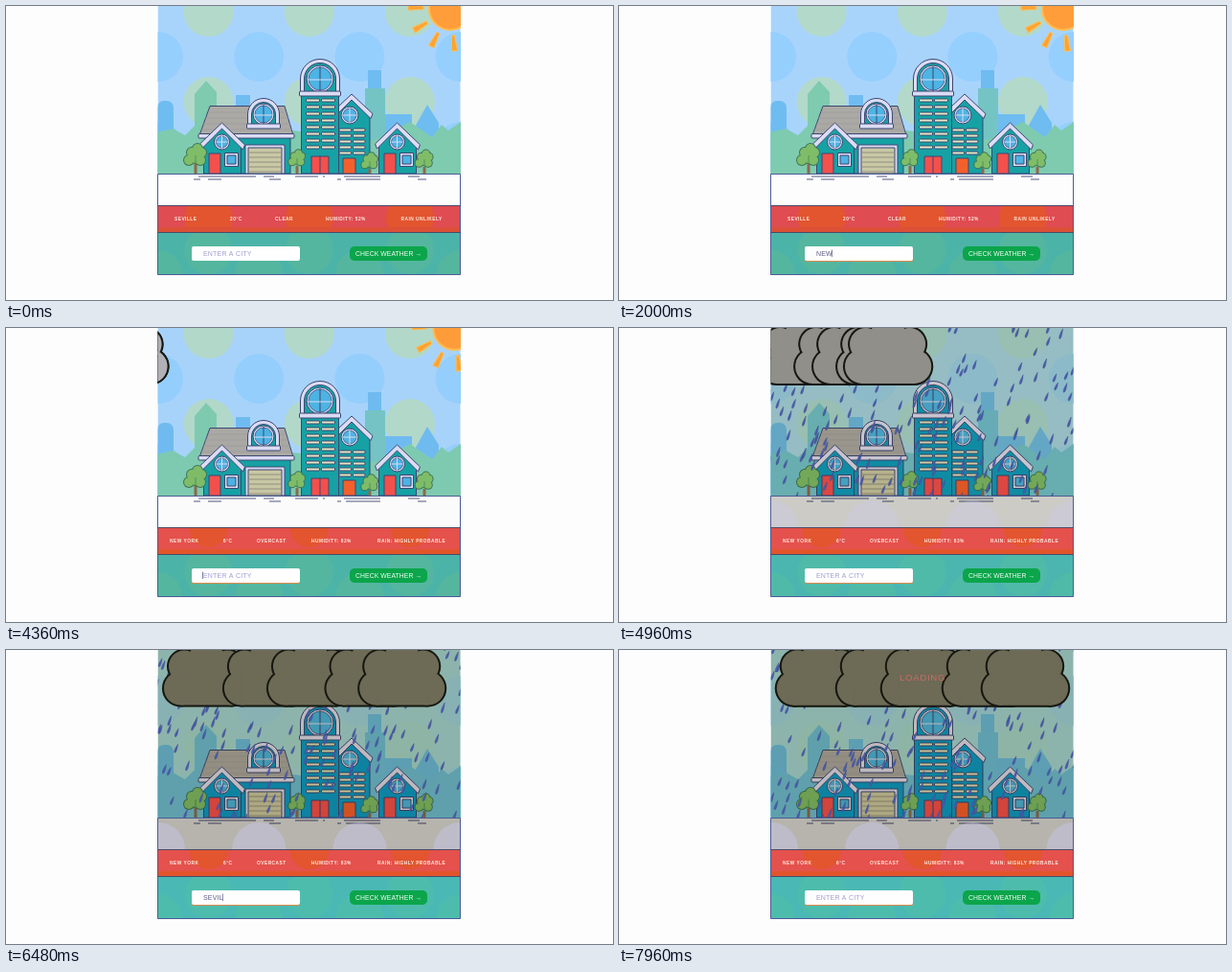
Recreate the animation shown at these times as an HTML page with a canvas. Size 634x307 px, loop 8000 ms.

```html
<!DOCTYPE html>
<html lang="en">
<head>
<meta charset="utf-8">
<title>City weather</title>
<style>
  html, body { margin: 0; width: 100%; height: 100%; overflow: hidden; background: #fdfdfe; }
  canvas { display: block; }
</style>
</head>
<body>
<canvas id="stage" width="634" height="307"></canvas>
<script>
const ctx = document.getElementById('stage').getContext('2d');
const LOOP = 8000, LEFT = 158.5, WIDTH = 316, GROUND = 176;
const INK = '#3d4773', TRIM = '#dcdcf4', GLASS = '#4db4e4', PANE = '#e4e8c4';
const STORM_START = 4325, DATA_CHANGE = 4240;

const reports = {
  sunny: [['SEVILLE', 176], ['20°C', 234], ['CLEAR', 281], ['HUMIDITY: 52%', 334], ['RAIN UNLIKELY', 412.5]],
  rainy: [['NEW YORK', 171], ['6°C', 227], ['OVERCAST', 262], ['HUMIDITY: 83%', 319], ['RAIN: HIGHLY PROBABLE', 388]]
};
const searches = [
  { word: 'NEW YORK', start: 1580, step: 180, submit: 3020, done: DATA_CHANGE },
  { word: 'SEVILLE', start: 5640, step: 170, submit: 6980, done: LOOP }
];

let dark = 0;  // 0 in sunshine, 1 in the full storm

const clamp = v => Math.max(0, Math.min(1, v));
const mix = (a, b, p) => `rgb(${a.map((v, i) => Math.round(v + (b[i] - v) * p))})`;
const weather = (sunny, stormy) => mix(sunny, stormy, dark);
const wall = () => weather([22, 162, 164], [14, 155, 206]);

function paint(fill, stroke, width = 1) {
  if (fill) { ctx.fillStyle = fill; ctx.fill(); }
  if (stroke) { ctx.strokeStyle = stroke; ctx.lineWidth = width; ctx.stroke(); }
}
function box(x, y, w, h, fill, stroke, radius = 0) {
  ctx.beginPath();
  ctx.roundRect(x, y, w, h, radius);
  paint(fill, stroke);
}
function circle(x, y, r, fill, stroke, width) {
  ctx.beginPath();
  ctx.arc(x, y, r, 0, Math.PI * 2);
  paint(fill, stroke, width);
}
function poly(points, fill, stroke) {
  ctx.beginPath();
  points.forEach(([x, y]) => ctx.lineTo(x, y));
  ctx.closePath();
  paint(fill, stroke);
}
function line(x1, y1, x2, y2, color, width = 1) {
  ctx.beginPath();
  ctx.moveTo(x1, y1);
  ctx.lineTo(x2, y2);
  paint(null, color, width);
}
function text(string, x, y, size, spacing, color, weight = 'normal') {
  ctx.font = `${weight} ${size}px "Liberation Sans", Arial, sans-serif`;
  ctx.letterSpacing = spacing + 'px';
  ctx.textBaseline = 'middle';
  ctx.fillStyle = color;
  ctx.fillText(string, x, y);
  return ctx.measureText(string).width;
}
function clipped(x, y, w, h, draw) {
  ctx.save();
  ctx.beginPath();
  ctx.rect(x, y, w, h);
  ctx.clip();
  draw();
  ctx.restore();
}

function sky() {
  box(LEFT, 0, WIDTH, GROUND, weather([168, 212, 252], [163, 214, 219]));
  const green = weather([179, 217, 202], [163, 214, 210]);
  const blue = weather([149, 207, 254], [158, 210, 228]);
  for (let row = 0; row < 4; row++) {
    for (let col = 0; col < 7; col++) {
      if ((row + col) % 2) circle(159 + col * 52.6, 6 + row * 47, 26, row % 2 ? blue : green);
    }
  }
}

function skyline() {
  const blue = weather([111, 188, 241], [108, 188, 228]);
  const green = weather([126, 203, 176], [110, 190, 220]);
  box(158, 99, 17, 77, blue, null, [7, 7, 0, 0]);
  box(240, 93, 15, 83, blue);
  box(396, 113, 28, 63, blue);
  poly([[425, 176], [425, 130], [440, 103], [452, 122], [452, 176]], blue);
  poly([[197, 176], [197, 92], [209, 78], [220, 90], [220, 176]], green);
  box(378, 67, 14, 109, blue);
  box(375, 86, 21, 90, weather([117, 196, 196], [110, 190, 222]));
  poly([[158, 176], [158, 132], [174, 128], [187, 135], [200, 122], [235, 140], [300, 130], [385, 140],
    [422, 121], [445, 137], [455, 124], [462, 130], [475, 121], [475, 176]], green);
}

function sun(t) {
  const leave = clamp((t - 4200) / 500);
  if (leave === 1) return;
  const pulse = (1 - Math.cos(t / 1000 * Math.PI)) / 2;
  ctx.save();
  ctx.translate(464 + leave * leave * 45, 3 - leave * 8);
  circle(0, 0, 22 + pulse, '#ff9d3a', '#ffbd50', 2);
  for (let i = 0; i < 11; i++) {
    ctx.save();
    ctx.rotate(84 * Math.PI / 180 + i / 11 * Math.PI * 2);
    ctx.translate(pulse * 2, 0);
    poly([[28, -1.5], [44, -3], [44, 3], [28, 1.5]], '#ffa332', '#ffbd50');
    ctx.restore();
  }
  ctx.restore();
}

function roundWindow(x, y, r) {
  circle(x, y, r, TRIM, INK);
  circle(x, y, r - 2, GLASS, INK, .7);
  line(x - r + 2, y, x + r - 2, y, TRIM);
  line(x, y - r + 2, x, y + r - 2, TRIM);
}
function archWindow(x, y, outer, inner, base) {
  const arch = (r, fill) => {
    ctx.beginPath();
    ctx.moveTo(x - r, base);
    ctx.lineTo(x - r, y);
    ctx.arc(x, y, r, Math.PI, 0);
    ctx.lineTo(x + r, base);
    ctx.closePath();
    paint(fill, INK);
  };
  arch(outer, TRIM);
  arch(outer - 4, wall());
  circle(x, y, inner, TRIM, INK);
  circle(x, y, inner - 2, GLASS, INK, .7);
  line(x, y - inner + 1, x, y + inner - 1, INK);
  line(x - inner + 1, y + 1, x + inner - 1, y + 1, TRIM);
  box(x - outer - 1, base - 4, outer * 2 + 2, 5, TRIM, INK, 1);
}
function gable(x, peak, halfLeft, halfRight, drop) {
  const edge = drop * halfRight / halfLeft;
  poly([[x, peak], [x + halfRight, peak + edge], [x + halfRight - 2, peak + edge + 5], [x, peak + 6],
    [x - halfLeft + 2, peak + drop + 5], [x - halfLeft, peak + drop]], TRIM, INK);
}
function door(x, y, w, color = '#f4504c') {
  box(x, y, w, 175 - y, color, INK);
}
function cottage(x) {
  poly([[x - 19, 175], [x - 19, 143], [x, 126], [x + 20, 143], [x + 20, 175]], wall(), INK);
  gable(x, 122, 23, 24, 22);
  roundWindow(x, 142, 8);
  door(x - 13.5, 154, 12);
  box(x + 3, 153.5, 14, 14, TRIM, INK);
  box(x + 5.5, 156, 9, 9, GLASS, INK);
}
function blinds(x, y, width, rows, step) {
  for (let i = 0; i < rows; i++) {
    for (const offset of [0, width + 2]) box(x + offset, y + i * step, width, 3, PANE, INK, 1);
  }
}
function tree(x, y, size) {
  const leaves = [[-7, 5, 6], [5, 5, 6], [-4, -3, 6], [2, -7, 6], [6, -3, 6], [0, 2, 7]];
  line(x, y + 8, x, 175, '#8d6948', 3);
  for (const [dx, dy, r] of leaves) circle(x + dx * size, y + dy * size, r * size, '#3f7557');
  for (const [dx, dy, r] of leaves) circle(x + dx * size, y + dy * size, r * size - 1, '#7fbd68');
  line(x, y, x, y + 9, '#54905a');
}

function town() {
  box(208, 134, 89, 41, wall(), INK);
  poly([[213, 104.5], [291, 104.5], [300, 135], [202, 135]], '#aaa9a4', INK);
  for (let i = 0; i < 4; i++) line(211 - i * 3, 111 + i * 6, 293 + i * 2, 111 + i * 6, '#99999f', .6);
  box(201, 133.5, 100, 4.5, TRIM, INK, 1);
  archWindow(269, 113, 16.5, 11, 127);
  box(250, 145, 41, 30, TRIM, INK);
  box(253, 148, 35, 27, '#c9c8a5', INK);
  for (let y = 153; y < 175; y += 5) line(253, y, 288, y, '#918f80');
  cottage(225.5);

  poly([[346, 175], [346, 107], [361, 96], [380, 113], [380, 175]], wall(), INK);
  gable(361, 92, 15, 22, 14);
  roundWindow(359, 114, 9);
  blinds(348, 128, 12.5, 5, 6);
  door(352, 159, 13, '#f4602c');
  box(308.5, 91, 39, 84, wall(), INK);
  archWindow(328, 76, 20.5, 14, 93);
  blinds(313.5, 97, 14, 8, 7);
  door(319, 157, 18);
  line(328, 157, 328, 175, INK);
  cottage(408.5);

  tree(198, 156, 1);
  tree(304, 159, .75);
  tree(380, 162, .75);
  tree(437, 160, .8);
}

function ground() {
  box(LEFT, GROUND, WIDTH, 33, '#fdfdfe');
  for (const [x, y, w] of [[201, 178, 60], [269, 178, 11], [302, 178, 24], [331, 178, 2], [353, 178, 38],
    [420, 178, 12], [196, 181, 7], [211, 181, 14], [275, 181, 12], [346, 181, 4], [355, 181, 36], [430, 181, 9]])
    line(x, y, x + w, y, '#8b8fa9', 1.3);
}

function gloom() {
  if (!dark) return;
  ctx.globalCompositeOperation = 'multiply';
  box(LEFT, 0, WIDTH, GROUND, weather([255, 255, 255], [220, 215, 200]));
  box(LEFT, GROUND, WIDTH, 33, weather([255, 255, 255], [184, 182, 174]));
  ctx.globalCompositeOperation = 'source-over';
  clipped(LEFT, GROUND + 4, WIDTH, 30, () => {
    ctx.globalAlpha = dark * .4;
    for (let i = 0; i < 4; i++) circle(159 + i * 105.2, 208, 28, '#ccc9f4');
    ctx.globalAlpha = 1;
  });
}

function rain(t) {
  const show = clamp((t - 4450) / 350);
  if (!show) return;
  let seed = 17;
  const random = () => (seed = seed * 16807 % 2147483647) / 2147483647;
  ctx.globalAlpha = show;
  for (let i = 0; i < 190; i++) {
    const fall = (random() * 195 + (t - 4400) * .22) % 195;
    const x = 158 + (i % 28) * 12.4 + random() * 9 - fall * .08;
    const y = fall - 10, length = 8 + random() * 3;
    ctx.beginPath();
    ctx.moveTo(x + 3.5, y);
    ctx.quadraticCurveTo(x + 2.5, y + length, x, y + length);
    ctx.quadraticCurveTo(x - 1.5, y + length - 2, x + 3.5, y);
    paint('#4a5cae', '#3a4684', .4);
  }
  ctx.globalAlpha = 1;
}

function clouds(t) {
  const age = t - STORM_START;
  if (age <= 0) return;
  const fill = mix([178, 178, 185], [109, 106, 86], clamp(age / 1300));
  const swell = 1 + .02 * (1 - Math.cos(age / 1000 * Math.PI)) / 2;
  const lobes = [[-27, 40, 19], [27, 40, 19], [-23, 17, 18], [22, 17, 18], [0, 9, 20]];
  [163, 226, 273, 337, 378].forEach((home, i) => {
    const slide = 1 - (1 - clamp(age / (2200 + i * 550))) ** 5;
    ctx.save();
    ctx.translate(65 + (home - 65) * slide + 46.5, 30);
    ctx.scale(swell, swell);
    ctx.translate(0, -30);
    for (const [x, y, r] of lobes) circle(x, y, r + .5, '#15170f');
    box(-27, 30, 54, 29.5, '#15170f');
    for (const [x, y, r] of lobes) circle(x, y, r - 1.5, fill);
    box(-27, 18, 54, 39.5, fill);
    ctx.restore();
  });
}

function reportBar(t) {
  const rainy = t >= DATA_CHANGE;
  clipped(LEFT, 209, WIDTH, 28, () => {
    box(LEFT, 209, WIDTH, 28, rainy ? '#e5514c' : '#df4c52');
    for (let i = 0; i < 3; i++) circle(211.6 + i * 105.2, rainy ? 209 : 222, rainy ? 20 : 25, '#e2552f');
    box(LEFT, 231, WIDTH, 6, rainy ? '#e2552b' : '#dc5038');
  });
  for (const [label, x] of reports[rainy ? 'rainy' : 'sunny']) text(label, x, 222.5, 4.8, .5, '#ffeae0', 'bold');
}

function searchPanel(t) {
  clipped(LEFT, 237, WIDTH, 44, () => {
    box(LEFT, 237, WIDTH, 44, weather([76, 179, 168], [74, 184, 180]));
    const spot = weather([84, 182, 158], [78, 188, 172]);
    for (let i = 0; i < 7; i++) circle(159 + i * 52.6, i % 2 ? 255 : 280, 25, spot);
  });
  const focused = t >= 1000;
  if (focused) box(194, 253, 113, 14, '#dc8a4c', null, 2);
  box(194, 251, 113, 15, '#fefefe', null, 2);

  const active = searches.find(s => t >= s.start && t < s.submit);
  const typed = active ? active.word.slice(0, 1 + Math.floor((t - active.start) / active.step)) : '';
  const width = text(typed || 'ENTER A CITY', 206, 258.8, 7, .2, typed ? '#5c5c86' : '#a29fd2');
  const resetAt = searches.filter(s => t >= s.submit).map(s => s.submit).pop() || 1000;
  const caretOn = active || (t - resetAt) % 1000 < 500;
  if (focused && caretOn) {
    const x = 205.5 + (typed ? width : 0);
    line(x, 254.5, x, 262, '#62628c', .8);
  }
  box(359, 251, 81, 15, '#0ba54b', null, 5);
  text('CHECK WEATHER →', 365, 259, 6.8, .1, '#f4fff6');
}

function frame() {
  const t = performance.now() % LOOP;
  dark = clamp((t - 4340) / 900);
  ctx.fillStyle = '#fdfdfe';
  ctx.fillRect(0, 0, 634, 307);
  clipped(LEFT, 0, WIDTH + .5, 281, () => {
    sky();
    sun(t);
    skyline();
    town();
    ground();
    gloom();
    clipped(LEFT, 0, WIDTH, GROUND - 1, () => rain(t));
    clouds(t);
    if (searches.some(s => t >= s.submit && t < s.done)) text('LOADING', 293, 29.5, 9.6, .7, '#cc6c64');
    reportBar(t);
    searchPanel(t);
  });
  box(LEFT, 175.5, WIDTH, 105, null, '#4b5c94');
  for (const y of [208.5, 236.5]) line(LEFT, y, LEFT + WIDTH, y, '#4b4a68');
  requestAnimationFrame(frame);
}
frame();
</script>
</body>
</html>
```
